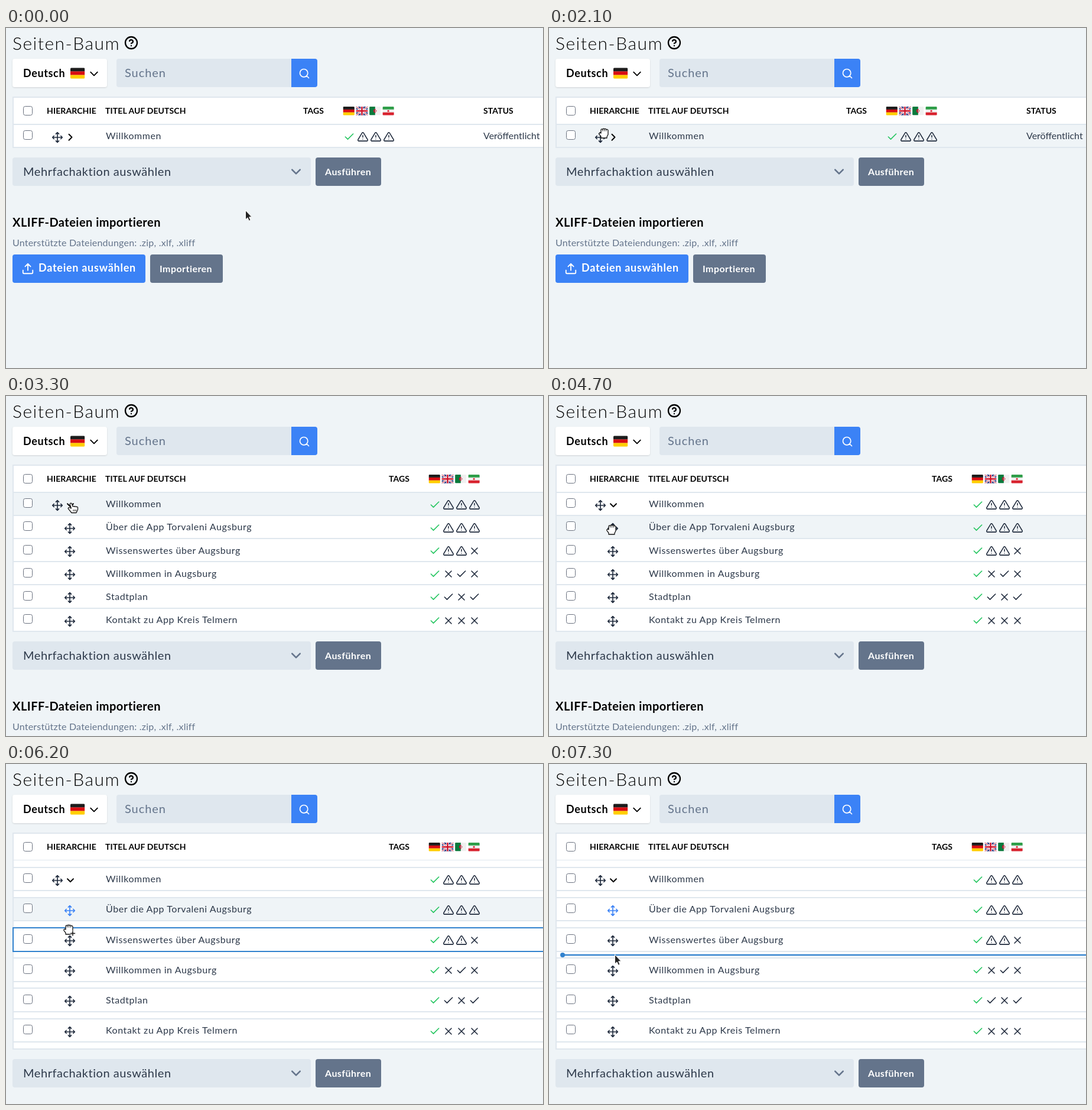
Recreate the animation shown at these times as an HTML page. Size 909 by 575 pixels, loop 8000 ms.

```html
<!DOCTYPE html>
<html lang="de">
<head>
<meta charset="utf-8">
<title>Seiten-Baum</title>
<style>
  html, body { margin: 0; width: 100%; height: 100%; overflow: hidden; background: #eff4f7; }
  svg { display: block; }
  text { font-family: Lato, sans-serif; font-size: 16px; letter-spacing: .57px; fill: #2d394a; white-space: pre; }
  .title { font-size: 30px; font-weight: 300; letter-spacing: 1.5px; fill: #000; }
  .lang { font-size: 18px; font-weight: 700; letter-spacing: .63px; fill: #000; }
  .search { font-size: 20px; letter-spacing: .95px; fill: #64748b; }
  .head { font-size: 14px; font-weight: 700; letter-spacing: .1px; fill: #000; }
  .state { letter-spacing: 0; }
  .select { font-size: 20px; letter-spacing: .55px; }
  .button { font-weight: 700; letter-spacing: .45px; fill: #fff; }
  .big { font-size: 18px; letter-spacing: .73px; }
  .section { font-size: 20px; font-weight: 700; letter-spacing: .48px; fill: #000; }
  .note { letter-spacing: .22px; fill: #64748b; }
</style>
</head>
<body>
<svg id="stage" width="909" height="575" viewBox="0 0 909 575">
  <defs><filter id="soft" x="-5%" y="-10%" width="110%" height="125%">
    <feDropShadow dx="0" dy="1" stdDeviation="1" flood-opacity=".14"/>
  </filter></defs>
  <g id="top"></g>
  <g id="table"></g>
  <g id="bottom"></g>
  <g id="cursor"></g>
</svg>
<script>
const LOOP = 8000, STEP = 100;
const INK = '#1e293b', LINE = '#dfe7ee', PALE = '#eff4f7', BLUE = '#3b82f6', SLATE = '#64748b';
const MARK = '#3182ce', DENY = '#b63c2a', GREEN = '#22c55e';

const ICONS = {
  help: 'M2 12a10 10 0 1 0 20 0a10 10 0 1 0-20 0M9.09 9a3 3 0 0 1 5.83 1c0 2-3 3-3 3M12 17h.01',
  search: 'M3 11a8 8 0 1 0 16 0a8 8 0 1 0-16 0M21 21l-4.35-4.35',
  down: 'M6 9l6 6 6-6',
  right: 'M9 18l6-6-6-6',
  upload: 'M21 15v4a2 2 0 0 1-2 2H5a2 2 0 0 1-2-2v-4M17 8l-5-5-5 5M12 3v12',
  move: 'M5 9l-3 3 3 3M9 5l3-3 3 3M15 19l-3 3-3-3M19 9l3 3-3 3M2 12h20M12 2v20',
  check: 'M20 6L9 17l-5-5',
  cross: 'M18 6L6 18M6 6l12 12',
  warn: 'M10.29 3.86L1.82 18a2 2 0 0 0 1.71 3h16.94a2 2 0 0 0 1.71-3L13.71 3.86a2 2 0 0 0-3.42 0zM12 9v4M12 17h.01'
};

const rect = (x, y, w, h, fill, extra = '') =>
  `<rect x="${x}" y="${y}" width="${w}" height="${h}" fill="${fill}" ${extra}/>`;
const text = (x, y, str, cls = '') => `<text x="${x}" y="${y}" class="${cls}">${str}</text>`;
const icon = (name, x, y, color = INK, size = 20, weight = 2) =>
  `<path d="${ICONS[name]}" transform="translate(${x} ${y}) scale(${size / 24}) translate(-12 -12)"
    fill="none" stroke="${color}" stroke-width="${weight}" stroke-linecap="round" stroke-linejoin="round"/>`;
const checkbox = y => rect(29.5, y - 7.5, 15, 15, '#fff', 'rx="3" stroke="#6b7280"');

// Flags are drawn in a 20 x 15 box.
const bands = colors => colors.map((c, i) => rect(0, i * 5, 20, 5.1, c)).join('');
const FLAGS = {
  de: bands(['#1c1c1c', '#d80d12', '#ffce00']),
  gb: rect(0, 0, 20, 15, '#27347f') +
    '<path d="M0 0L20 15M20 0L0 15" stroke="#fff" stroke-width="3"/>' +
    '<path d="M0 0L20 15M20 0L0 15" stroke="#cf142b" stroke-width="1"/>' +
    '<path d="M10 0V15M0 7.5H20" stroke="#fff" stroke-width="4.6"/>' +
    '<path d="M10 0V15M0 7.5H20" stroke="#cf142b" stroke-width="2.6"/>',
  dz: rect(0, 0, 20, 15, '#f0f0f0') + rect(0, 0, 10, 15, '#0a7a3c') +
    '<path d="M12 4.9A3.2 3.2 0 1 0 12 10.1A2.6 2.6 0 1 1 12 4.9Z" fill="#d21034"/>' +
    '<circle cx="11.8" cy="7.5" r="1" fill="#d21034"/>',
  ir: bands(['#2f9e49', '#f0f0f0', '#d8232f']) + '<circle cx="10" cy="7.5" r="1.6" fill="#d8232f"/>'
};
const flag = (name, x, y, scale = .97) =>
  `<g transform="translate(${x} ${y}) scale(${scale})" style="clip-path:inset(0 round 1.5px)">${FLAGS[name]}</g>`;

// Status letters: c = current, w = warning, k = checked, x = missing.
const ROWS = [
  ['Willkommen', 'cwww'],
  ['Über die App Torvaleni Augsburg', 'cwww'],
  ['Wissenswertes über Augsburg', 'cwwx'],
  ['Willkommen in Augsburg', 'cxkx'],
  ['Stadtplan', 'ckxk'],
  ['Kontakt zu App Kreis Telmern', 'cxxx']
];
const STATUS = { c: ['check', GREEN], w: ['warn', INK, 19], k: ['check', INK], x: ['cross', INK] };

// Time, position and, where it changes, the cursor shape.
const PATH = [
  [0, 405, 308, 'arrow'], [200, 405, 308], [300, 405, 309], [400, 405, 309], [600, 368, 316],
  [900, 306, 310], [1000, 306, 310], [1100, 209, 294], [1500, 209, 294], [1900, 95, 181, 'grab'],
  [2000, 95, 181], [2100, 93, 178], [2300, 105, 190, 'point'], [2500, 115, 199], [2900, 113, 189],
  [3700, 113, 189], [3800, 122, 190], [3900, 132, 192, 'arrow'], [4000, 132, 192],
  [4300, 120, 210], [4500, 108, 222, 'grab'], [4700, 106, 226], [5600, 106, 226], [5700, 106, 240],
  [6200, 106, 280, 'drag'], [6500, 108, 296], [6900, 111, 323], [7200, 111, 323],
  [7300, 111, 322, 'arrow'], [LOOP, 111, 322]
];

const outline = d => `<path d="${d}" fill="#fff" stroke="#111" stroke-width="1.3" stroke-linejoin="round"/>`;
const FIST = outline('M-5 8V5.5L-8 1.6C-8.7 0-7.4-1.2-6-.6L-5 0V-5.6C-5-7.6-2.5-7.6-2.2-6.2C-1.8-8.2-.2-8.4.6-6.8C1.4-8 3.2-7.8 3.6-6.2C5-7.2 6.9-6.2 7-4.6V2L5 6V8Z') +
  '<path d="M-2.2-6V-3.5M.7-6.5V-3.5M3.6-6V-3.5" stroke="#111" fill="none"/>';
const CURSORS = {
  arrow: '<path d="M.5.5V16L4 12.8 6.4 18.2 9 17 6.7 11.8H11.2Z" fill="#222" stroke="#fff" stroke-width="1"/>',
  grab: FIST,
  drag: FIST + '<path d="M7 2V11M2.5 6.5H11.5" stroke="#fff" stroke-width="3.4"/>' +
    '<path d="M7 2.4V10.6M2.9 6.5H11.1" stroke="#111" stroke-width="1.5"/>',
  point: outline('M-3-7.8C-4.6-7.8-5-6.2-4.6-5L-2.6 1-5 0C-7.6-1-8.6 1-7 2.4L-2 8.5H6L8.5 3V-.5C8-2 6.5-2 5.6-1.4C5-2.6 3.4-2.6 2.6-1.8C2-2.8.6-2.8 0-2.2L-1.5-6.5C-1.8-7.4-2.3-7.8-3-7.8Z') +
    '<path d="M1 3V6M3.2 3V6M5.4 3V6" stroke="#111" stroke-width=".9"/>'
};

function cursorAt(t) {
  const i = PATH.findIndex((p, n) => n && t < p[0]);
  const [t0, x0, y0] = PATH[i - 1], [t1, x1, y1] = PATH[i];
  const k = (t - t0) / (t1 - t0);
  const shape = PATH.slice(0, i).reverse().find(p => p[3])[3];
  return { shape, x: Math.round(x0 + (x1 - x0) * k), y: Math.round(y0 + (y1 - y0) * k) };
}

function stateAt(t) {
  return {
    open: t >= 3300,
    drag: t >= 5700,
    hover: t < 1800 || t >= 7300 ? -1 : t < 4300 ? 0 : 1,
    target: t < 5700 || t >= 6800 ? -1 : t < 6100 ? 1 : t < 6200 ? -1 : 2,
    gap: t >= 6800 ? 323 : t >= 6100 && t < 6200 ? 271 : 0
  };
}

function drawRow(i, s, shift) {
  const [name, marks] = ROWS[i];
  const child = i > 0;
  const offset = s.drag ? 12 + 51.2 * i : 39.2 * i;
  // Lines and icons snap down to whole pixels, text and boxes to the nearest.
  const y = Math.floor(offset + .01), near = Math.round(offset + .2);
  const closed = s.drag || !s.open || i === ROWS.length - 1;
  const foot = 201 + near;

  let out = rect(13, 164 + y, 900, 38, s.hover === i ? PALE : '#fff') + rect(11, 162 + y, 900, 2, LINE);
  if (closed) out += rect(11, foot, 900, 2, LINE);
  out += checkbox(181 + near) + icon('move', child ? 108 : 87, 185 + y, s.drag && i === 1 ? BLUE : INK);
  if (!child) out += icon(s.open ? 'down' : 'right', 109, 184.7 + y, '#000', 20, 2.3);
  out += text(169, 188 + near, name);
  [...marks].forEach((m, n) => {
    const [shape, color, size] = STATUS[m];
    out += icon(shape, 581 + shift + (n ? 1 : 0) + n * 22, 184 + y, color, size, 1.9);
  });
  out += text(808 + shift, 188 + near, 'Veröffentlicht', 'state');
  if (s.target === i)
    out += rect(12, 163 + y, 920, foot - 162 - y, 'none', `stroke="${i === 1 ? DENY : MARK}" stroke-width="2"`);
  return out;
}

function drawTable(s) {
  const shift = s.open ? 145 : 0;
  const end = s.drag ? 483 : s.open ? 399 : 203;
  let out = rect(11, 116, 920, end - 116, '#fff') + rect(11, 116, 920, 2, LINE) +
    rect(11, 162, 920, 1, LINE) + rect(11, end - 2, 920, 2, LINE) + rect(11, 116, 2, end - 116, LINE) +
    checkbox(140) + text(69, 145, 'HIERARCHIE', 'head') + text(168, 145, 'TITEL AUF DEUTSCH', 'head') +
    text(503 + shift, 145, 'TAGS', 'head') + text(808 + shift, 145, 'STATUS', 'head');
  Object.keys(FLAGS).forEach((f, n) => { out += flag(f, 570.5 + shift + n * 22.3, 133); });
  for (let i = 0; i < (s.open ? ROWS.length : 1); i++) out += drawRow(i, s, shift);
  if (s.gap) out += rect(23, s.gap - 1.2, 900, 2.4, MARK) + `<circle cx="23" cy="${s.gap}" r="4" fill="${MARK}"/>`;
  return out;
}

const $ = id => document.getElementById(id);

$('top').innerHTML = text(11, 37, 'Seiten-Baum', 'title') + icon('help', 212, 25, '#000', 24, 2.3) +
  rect(11, 52, 160, 48, '#fff', 'rx="4" filter="url(#soft)"') + text(29, 83, 'Deutsch', 'lang') +
  flag('de', 109, 67.3, 1.22) + icon('down', 149, 77.5, '#000', 23) +
  rect(187, 52, 300, 48, LINE, 'rx="4"') + text(201, 83, 'Suchen', 'search') +
  `<path d="M483 52H523a4 4 0 0 1 4 4V96a4 4 0 0 1-4 4H483Z" fill="${BLUE}"/>` + icon('search', 505, 77, '#fff');

$('bottom').innerHTML = rect(11, 219, 505, 48, LINE, 'rx="4"') +
  text(29, 250, 'Mehrfachaktion auswählen', 'select') + icon('down', 491, 243, SLATE, 27, 2.3) +
  rect(524, 219, 111, 48, SLATE, 'rx="4"') + text(540, 249, 'Ausführen', 'button') +
  text(11, 336, 'XLIFF-Dateien importieren', 'section') +
  text(11, 369, 'Unterstützte Dateiendungen: .zip, .xlf, .xliff', 'note') +
  rect(11, 383, 225, 48, BLUE, 'rx="4"') + icon('upload', 37, 407, '#fff', 22) +
  text(55, 412, 'Dateien auswählen', 'button big') +
  rect(244, 383, 123, 48, SLATE, 'rx="4"') + text(260, 413, 'Importieren', 'button');

let start, shown = '';
function frame(now) {
  start ??= now;
  const t = Math.floor(((now - start) % LOOP) / STEP) * STEP;
  const s = stateAt(t), key = JSON.stringify(s);
  if (key !== shown) {
    $('table').innerHTML = drawTable(s);
    $('bottom').setAttribute('transform', `translate(0 ${s.drag ? 280 : s.open ? 196 : 0})`);
    shown = key;
  }
  const c = cursorAt(t);
  $('cursor').innerHTML = `<g transform="translate(${c.x} ${c.y})">${CURSORS[c.shape]}</g>`;
  requestAnimationFrame(frame);
}
frame(performance.now());
</script>
</body>
</html>
```
